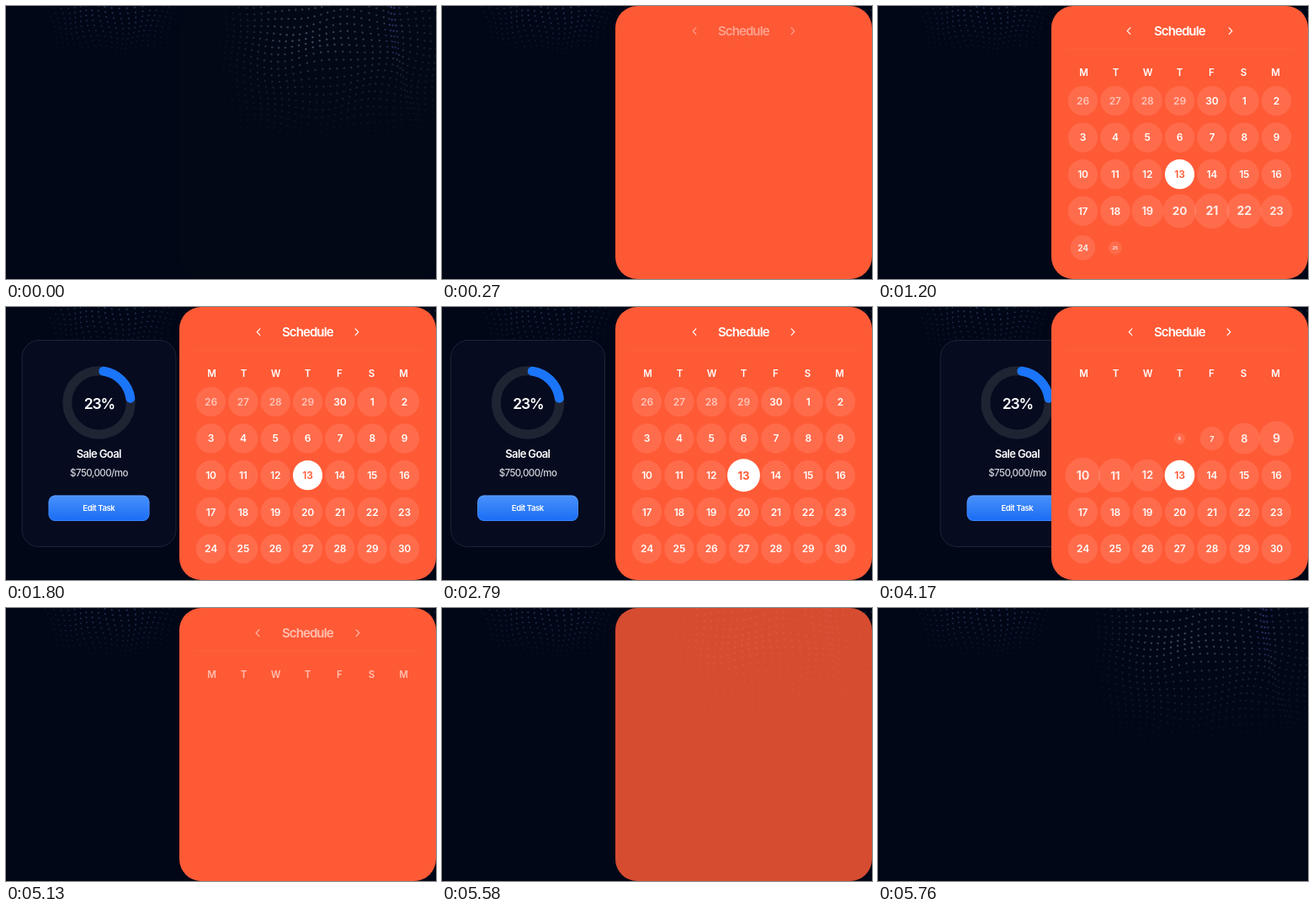
An HTML page with a canvas that plays this animation: 511 by 324 pixels, repeating every 5.79 s.

```html
<!DOCTYPE html>
<html lang="en">
<head>
<meta charset="utf-8">
<title>Schedule</title>
<style>
  html, body { margin: 0; width: 100%; height: 100%; overflow: hidden; background: #010716; }
  canvas { display: block; width: 511px; height: 324px; }
</style>
</head>
<body>
<canvas id="stage" width="511" height="324"></canvas>
<script>
const W = 511, H = 324, LOOP = 5790;
const ORANGE = '#ff5a36';
const ctx = document.getElementById('stage').getContext('2d');

const clamp = v => Math.max(0, Math.min(1, v));
const ramp = (t, from, to) => clamp((t - from) / (to - from));
const bump = (t, mid, half) =>
  Math.abs(t - mid) < half ? 0.5 + 0.5 * Math.cos(Math.PI * (t - mid) / half) : 0;

// Overshooting ease-out
function backOut(u) {
  if (u <= 0) return 0;
  if (u >= 1) return 1;
  const s = 2.5, v = u - 1;
  return 1 + (s + 1) * v * v * v + s * v * v;
}

function box(c, x, y, w, h, r) {
  c.beginPath();
  c.roundRect(x, y, w, h, r);
}

function disc(c, x, y, r) {
  c.beginPath();
  c.arc(x, y, r, 0, Math.PI * 2);
  c.fill();
}

// Centred text; y is the middle of the capitals
function label(str, x, y, size, weight, spacing, color) {
  ctx.font = `${weight} ${size}px Inter, "Liberation Sans", sans-serif`;
  ctx.letterSpacing = spacing + 'px';
  ctx.textAlign = 'center';
  ctx.textBaseline = 'alphabetic';
  ctx.fillStyle = color;
  ctx.fillText(str, x, y + size * 0.364);
}

function makeBackdrop() {
  const cv = document.createElement('canvas');
  cv.width = W;
  cv.height = H;
  const c = cv.getContext('2d');
  c.fillStyle = '#010716';
  c.fillRect(0, 0, W, H);

  // Rippled sheet of dots, top right, pinched in the middle and along a crease
  for (let j = -3; j < 22; j++) {
    for (let i = 0; i < 34; i++) {
      const u = 252 + 8.2 * i - 1.2 * Math.max(0, i - 22);
      const v = 3 + 8.1 * j + 6 * Math.sin(i * 0.27 - j * 0.14) + 2 * Math.sin(i * 0.55 + j * 0.4);
      const pinch = Math.exp(-Math.pow((u - 365) / 45, 2) - Math.pow((v - 42) / 26, 2));
      const y = v - 0.3 * (v - 42) * pinch;
      const crease = 460 + Math.max(0, y - 50) * 0.35;
      const d = (u - crease) / 18;
      const x = u - 11 * d * Math.exp(-d * d) + 2.5 * Math.sin(j * 0.42 + i * 0.2);
      const near = Math.exp(-Math.pow((x - crease) / 9, 2)) * (1 - ramp(y, 25, 75));
      const light = ramp(x, 245, 320) * (1 - ramp(y, 40, 168)) * (1 - 0.5 * ramp(x, 430, 511));
      c.globalAlpha = clamp(0.36 * light + 0.18 * pinch + 0.25 * near);
      c.fillStyle = near > 0.3 ? '#4c539f' : '#74829f';
      disc(c, x, y, 1.2);
    }
  }

  // Fanned columns, top left
  c.fillStyle = '#47619a';
  for (let i = 0; i < 20; i++) {
    for (let j = 0; j < 10; j++) {
      const u = 46 + 8.2 * i;
      const y = 1 + 6 * j + 2 * Math.sin(i * 0.7);
      const x = u + (140 - u) * 0.004 * y + 2.5 * Math.sin(j * 0.5 + i * 0.5);
      const light = ramp(x, 32, 95) * (1 - ramp(x, 165, 212)) * (1 - ramp(y, 10, 62));
      c.globalAlpha = 0.46 * light;
      disc(c, x, y, 1.1);
    }
  }
  return cv;
}

const backdrop = makeBackdrop();

function drawCard(x) {
  ctx.save();
  ctx.translate(x, 39);

  box(ctx, 0.5, 0.5, 183, 245, 20);
  ctx.fillStyle = '#060b20';
  ctx.fill();
  ctx.strokeStyle = '#1e243b';
  ctx.lineWidth = 1;
  ctx.stroke();

  ctx.lineWidth = 11;
  ctx.strokeStyle = '#1f2433';
  ctx.beginPath();
  ctx.arc(92, 74.5, 37.7, 0, Math.PI * 2);
  ctx.stroke();
  ctx.strokeStyle = '#1a75fa';
  ctx.lineCap = 'round';
  ctx.beginPath();
  ctx.arc(92, 74.5, 37.7, -1.43, -0.14);
  ctx.stroke();

  label('23%', 92.3, 75.5, 17.5, 600, -1.1, '#fff');
  label('Sale Goal', 91.8, 135.5, 13, 600, -0.65, '#fff');
  label('$750,000/mo', 92, 157.5, 11.5, 500, -0.55, '#d2d4da');

  const blue = ctx.createLinearGradient(0, 184, 0, 215);
  blue.addColorStop(0, '#4a92fb');
  blue.addColorStop(1, '#1a6cf5');
  box(ctx, 32, 184.5, 120, 30.5, 8);
  ctx.fillStyle = blue;
  ctx.fill();
  box(ctx, 32.5, 185, 119, 29.5, 7.5);
  ctx.strokeStyle = 'rgba(130,180,255,0.3)';
  ctx.lineWidth = 1;
  ctx.stroke();
  label('Edit Task', 91.8, 200, 9.5, 600, -0.4, '#fff');
  ctx.restore();
}

function chevron(x, dir) {
  ctx.beginPath();
  ctx.moveTo(x - 1.8 * dir, 25.8);
  ctx.lineTo(x + 1.8 * dir, 29.6);
  ctx.lineTo(x - 1.8 * dir, 33.4);
  ctx.stroke();
}

function drawHeader(t, alpha) {
  const out = 1 - ramp(t, 4980, 5370);
  const nudge = 2 * (bump(t, 1200, 540) + bump(t, 3300, 540) + bump(t, 5400, 540));

  ctx.globalAlpha = alpha * out * ramp(t, 150, 420);
  label('Schedule', 358.3, 29.8, 15, 600, -0.9, '#fff');
  ctx.strokeStyle = '#fff';
  ctx.lineWidth = 1.2;
  ctx.lineCap = ctx.lineJoin = 'round';
  chevron(300 - nudge, -1);
  chevron(417 + nudge, 1);

  ctx.globalAlpha = alpha * out * ramp(t, 270, 540);
  ctx.fillStyle = 'rgba(255,255,255,0.04)';
  ctx.fillRect(223, 50.5, 271, 1);
  [...'MTWTFSM'].forEach((d, i) => label(d, 244.5 + 38 * i, 79, 11.5, 600, 0, '#fff'));
  ctx.globalAlpha = alpha;
}

function drawDay(t, i) {
  const enter = (t - 308 - 30 * i) / 250;
  const leave = (t - 3640 - 30 * i) / 250;
  let scale = backOut(Math.min(enter, 1 - leave));
  if (scale <= 0) return;

  const today = i === 17;
  if (today) scale *= 1 + 0.15 * bump(t, 2685, 285);
  const moving = Math.abs(scale - 1) > 0.03;
  const day = i < 4 ? 26 + i : i === 4 ? 30 : i - 4;
  const ink = today ? ORANGE : `rgba(255,255,255,${i < 4 ? 0.6 : moving ? 0.85 : 1})`;

  ctx.save();
  ctx.translate(243.5 + 38.33 * (i % 7), 112.5 + 43.6 * Math.floor(i / 7));
  ctx.scale(scale, scale);
  ctx.fillStyle = today ? '#fff' : 'rgba(255,255,255,0.11)';
  disc(ctx, 0, 0, 17.6);
  label(String(day), 0, 0, 12, moving ? 700 : 600, -0.2, ink);
  ctx.restore();
}

function drawPanel(t) {
  const alpha = (1 - (1 - ramp(t, 0, 300)) ** 2) * (1 - ramp(t, 5460, 5760) ** 2);
  if (alpha <= 0) return;
  ctx.globalAlpha = alpha;
  box(ctx, 206, 0, 305, 324, 26);
  ctx.fillStyle = ORANGE;
  ctx.fill();
  drawHeader(t, alpha);
  for (let i = 0; i < 35; i++) drawDay(t, i);
  ctx.globalAlpha = 1;
}

function draw(t) {
  ctx.globalAlpha = 1;
  ctx.drawImage(backdrop, 0, 0);
  // The card slides out from behind the panel and back again
  const hidden = (1 - ramp(t, 1280, 2080)) ** 3 + ramp(t, 3625, 4425) ** 3;
  if (hidden < 1) drawCard(10 + 200 * hidden);
  drawPanel(t);
}

const start = performance.now();
function tick() {
  draw((performance.now() - start) % LOOP);
  requestAnimationFrame(tick);
}
draw(0);
requestAnimationFrame(tick);
</script>
</body>
</html>
```
